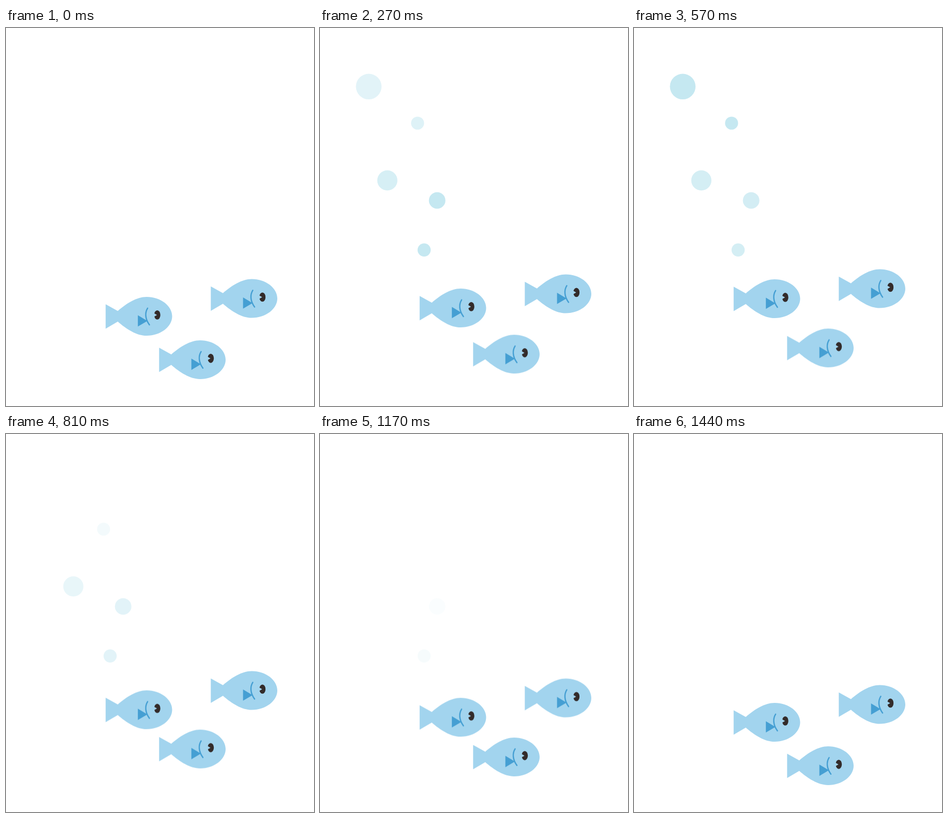
Animation, 596 px wide and 731 px high, one loop 1800 ms. Source, as an HTML page:

```html
<!DOCTYPE html>
<html lang="en">
<head>
<meta charset="utf-8">
<title>Fish and bubbles</title>
<style>
html, body { margin: 0; width: 100%; height: 100%; overflow: hidden; background: #fff; }
svg { display: block; width: 596px; height: 731px; }

/* Every segment advances in 30 ms steps. */
.fish, .bubbles circle { animation: 1800ms step-end infinite; }

.left { animation-name: left; }
.right { animation-name: right; }
.low { animation-name: low; }

@keyframes left {
  0% { transform: translateY(0); animation-timing-function: steps(19); }
  31.6667% { transform: translateY(-34px); animation-timing-function: steps(28); }
  78.3333%, 100% { transform: translateY(0); }
}
@keyframes right {
  0% { transform: translateY(0); animation-timing-function: steps(28); }
  46.6667% { transform: translateY(-28px); animation-timing-function: steps(20); }
  80%, 100% { transform: translateY(0); }
}
@keyframes low {
  0% { transform: translateY(0); animation-timing-function: steps(30); }
  50% { transform: translateY(-35.9px); animation-timing-function: steps(17); }
  78.3333%, 100% { transform: translateY(0); }
}

.bubbles { fill: #c5e8f1; }
.bubbles circle { opacity: 0; }
.bubbles .b1 { animation-name: b1; }
.bubbles .b2 { animation-name: b2; }
.bubbles .b3 { animation-name: b3; }
.bubbles .b4 { animation-name: b4; }
.bubbles .b5 { animation-name: b5; }

@keyframes b1 {
  0% { opacity: 0; animation-timing-function: steps(18); }
  30% { opacity: 1; }
  31.6667% { opacity: 1; animation-timing-function: steps(8); }
  45%, 100% { opacity: 0; }
}
@keyframes b2 {
  0% { opacity: 0; animation-timing-function: steps(16); }
  26.6667% { opacity: 1; }
  31.6667% { opacity: 1; animation-timing-function: steps(10); }
  48.3333%, 100% { opacity: 0; }
}
@keyframes b3 {
  0% { opacity: 0; animation-timing-function: steps(13); }
  21.6667% { opacity: 1; animation-timing-function: steps(23); }
  60%, 100% { opacity: 0; }
}
@keyframes b4 {
  0% { opacity: 0; animation-timing-function: steps(9); }
  15% { opacity: 1; }
  20% { opacity: 1; animation-timing-function: steps(29); }
  68.3333%, 100% { opacity: 0; }
}
@keyframes b5 {
  0% { opacity: 0; animation-timing-function: steps(9); }
  15% { opacity: 1; }
  16.6667% { opacity: 1; animation-timing-function: steps(34); }
  73.3333%, 100% { opacity: 0; }
}
</style>
</head>
<body>
<svg viewBox="0 0 596 731" xmlns="http://www.w3.org/2000/svg">
  <defs>
    <g id="fish">
      <path fill="#a2d4ee" d="M23.5 27.2C40 13 60 0 79.3 0C106 0 128.7 17 128.7 37.5S106 75 79.3 75C60 75 40 62 23.5 47.6L0 61.3V14.2Z"/>
      <path fill="#459fd3" d="M62.4 35.3V57.2L80.8 46.3Z"/>
      <path fill="none" stroke="#459fd3" stroke-width="2.5" stroke-linecap="round" d="M81.2 21.8C76 30 76 42 84.7 53.8"/>
      <ellipse fill="#332b2a" cx="99.9" cy="34.8" rx="6" ry="8.9"/>
      <path fill="#a2d4ee" d="M92.6 31L99.4 35L92.6 39Z"/>
    </g>
  </defs>
  <g class="bubbles">
    <circle class="b1" cx="94.3" cy="113.3" r="24.8"/>
    <circle class="b2" cx="188.8" cy="184" r="12.6"/>
    <circle class="b3" cx="130.3" cy="294.8" r="19.5"/>
    <circle class="b4" cx="226.7" cy="333.5" r="16"/>
    <circle class="b5" cx="201.5" cy="429.3" r="12.7"/>
  </g>
  <g class="fish left"><use href="#fish" x="192.8" y="520.1"/></g>
  <g class="fish right"><use href="#fish" x="396.3" y="485.6"/></g>
  <g class="fish low"><use href="#fish" x="296.3" y="604"/></g>
</svg>
</body>
</html>
```
